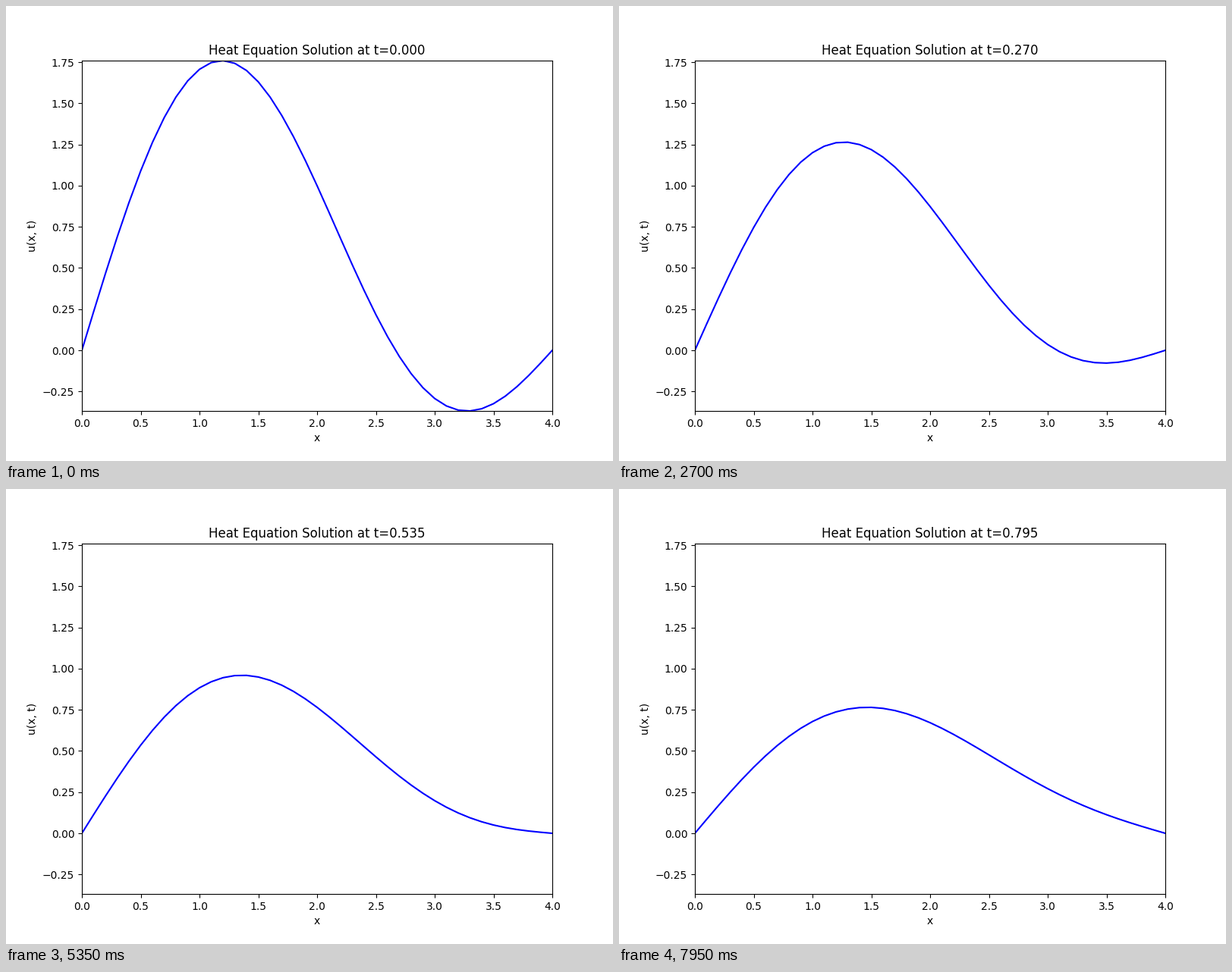
Recreate the animation shown at these times as a matplotlib script. Size 800 by 600 pixels, loop 8 s.

```python
import numpy as np
import matplotlib.pyplot as plt
from matplotlib.animation import FuncAnimation

LENGTH = 4.0
FRAMES = 160
INTERVAL = 50   # ms
DT = 0.005      # time shown per frame

x = np.linspace(0, LENGTH, 41)


def heat(t):
    """Two decaying sine modes with fixed zero ends."""
    slow = np.exp(-0.5 * t) * np.sin(np.pi * x / 4)
    fast = np.exp(-2.0 * t) * np.sin(np.pi * x / 2)
    return slow + fast


fig, ax = plt.subplots(figsize=(8, 6), dpi=100)
start = heat(0)
line, = ax.plot(x, start, color="blue", lw=1.5)
ax.set_xlim(0, LENGTH)
ax.set_ylim(start.min(), start.max())
ax.set_xlabel("x")
ax.set_ylabel("u(x, t)")
title = ax.set_title("")


def update(n):
    t = n * DT
    line.set_ydata(heat(t))
    title.set_text(f"Heat Equation Solution at t={t:.3f}")
    return line, title


anim = FuncAnimation(fig, update, frames=FRAMES, interval=INTERVAL,
                     repeat=True, repeat_delay=0, blit=False)
plt.show()
```
